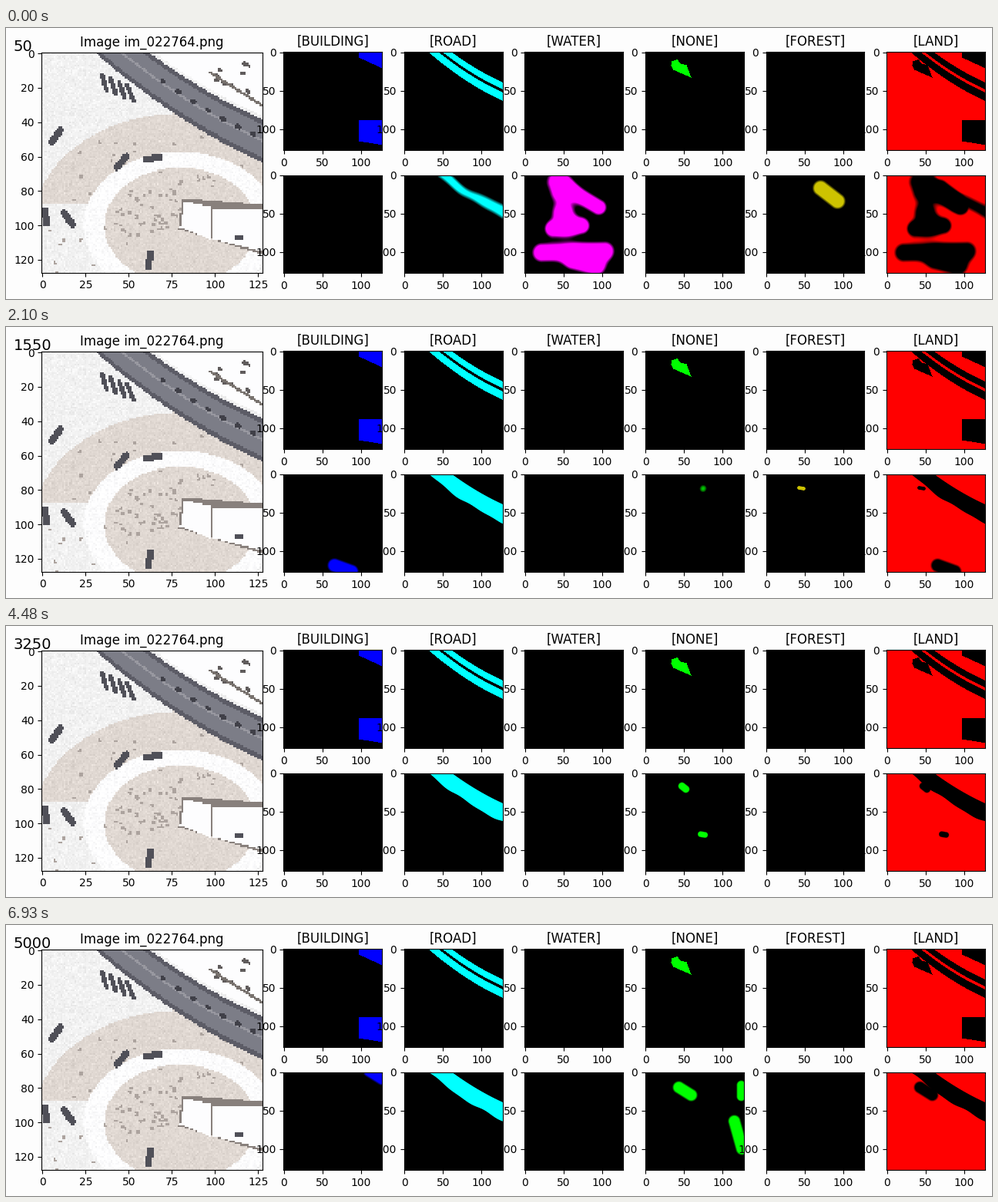
A matplotlib script that plays this animation: 1280x353 px, repeating every 7 s.

```python
import numpy as np
import matplotlib.pyplot as plt
from matplotlib.animation import FuncAnimation
from matplotlib.path import Path

W, H, DPI = 1280, 353, 100
N, FRAMES, STEP = 128, 100, 50
COLORS = {
    "BUILDING": (0, 0, 255),
    "ROAD": (0, 255, 255),
    "WATER": (255, 0, 255),
    "NONE": (0, 255, 0),
    "FOREST": (205, 195, 0),
    "LAND": (255, 0, 0),
}

rng = np.random.default_rng(7)
Y, X = np.mgrid[0:N, 0:N].astype(float)
GRID = np.column_stack([X.ravel(), Y.ravel()])


def inside(*pts):
    return Path(pts).contains_points(GRID).reshape(N, N)


def distance(a, b):
    """Distance of every pixel to the segment a-b."""
    (ax, ay), (bx, by) = a, b
    dx, dy = bx - ax, by - ay
    t = ((X - ax) * dx + (Y - ay) * dy) / max(dx * dx + dy * dy, 1e-9)
    t = np.clip(t, 0, 1)
    return np.hypot(X - ax - t * dx, Y - ay - t * dy)


def curve(x):
    """Lower edge of the highway; all road shapes are bands above it."""
    return .86 * (x - 31) - .0021 * (x - 31) ** 2


DEPTH = curve(X) - Y


def band(near, far):
    return (DEPTH > near) & (DEPTH < far)


def paint(mask, cls):
    return (mask[..., None] * COLORS[cls]).astype(np.uint8)


# ---- aerial view, reduced to flat shapes ----
def aerial():
    img = np.full((N, N, 3), 242.0)
    dark, sand, white = (80, 80, 88), (224, 216, 210), (253, 253, 254)

    def bar(x, y, length, deg, width=4, color=dark):
        a = np.radians(deg)
        d = np.array([np.cos(a), np.sin(a)]) * (length - width) / 2
        img[distance((x - d[0], y - d[1]), (x + d[0], y + d[1])) < width / 2] = color

    # curved track between two sandy rings
    ring = np.hypot((X - 80) / 55, (Y - 100) / 42)
    img[(ring > 1.02) & (ring < 1.55) & (Y < 88)] = sand
    img[(ring > .8) & (ring < 1.02)] = white
    img[ring < .8] = sand
    img += rng.normal(0, 5, (N, N, 1))
    for a, r in rng.uniform((2.6, .1), (5.6, 1.5), (110, 2)):
        if not .8 < r < 1.05:
            bar(80 + 55 * r * np.cos(a), 100 + 42 * r * np.sin(a), 2, 0, 1.8,
                (172, 163, 158))

    # upper right block, highway with lanes and cars
    img[DEPTH > 27] = white
    for x, y in rng.uniform((97, 4), (126, 24), (9, 2)):
        bar(x, y, 3, 30, 2, (96, 92, 92))
    img[distance((97, 11), (127, 30)) < .8] = (120, 114, 110)
    img[band(0, 25)] = (124, 125, 135)
    img[band(0, 3) | band(22, 25)] = (92, 92, 102)
    img[band(12, 13.5)] = (152, 152, 160)
    for x in np.linspace(70, 122, 7):
        bar(x, curve(x) - 14, 4, 32, 2.6, (64, 64, 72))

    # lower right halls
    halls = inside((81, 84), (128, 88), (128, 117), (79, 102))
    img[halls] = (136, 128, 124)
    img[inside((82, 86), (97, 89), (97, 108), (80, 101))] = white
    img[inside((99, 90), (128, 90), (128, 115), (99, 108))] = white
    bar(114, 107, 5, 0, 3)

    # parked vehicles
    for i in range(4):
        bar(36 + 5 * i, 17 + 2 * i, 12, 75 - 3 * i, 2.6)
    for x, y, deg in ((8, 48, -55), (46, 63, -50), (64, 61, -5),
                      (15, 96, 57), (62, 120, -85), (2, 95, 80)):
        bar(x, y, 12, deg)
    return np.clip(img, 0, 255).astype(np.uint8)


# ---- labelled masks, top row ----
def truth():
    m = {c: np.zeros((N, N), bool) for c in COLORS}
    m["BUILDING"] = (inside((97.5, -1), (129, -1), (129, 21.5), (97.5, 7))
                     | inside((98, 88), (129, 89), (129, 121), (97.5, 116)))
    m["ROAD"] = band(0, 11) | band(15, 24)
    m["NONE"] = inside((34, 12), (41, 9.5), (45, 15), (53, 17), (59, 33),
                       (45, 27), (36, 23), (33, 17))
    m["LAND"] = ~(m["BUILDING"] | m["ROAD"] | m["NONE"])
    return m


# ---- predicted masks, bottom row ----
blobs = []


def blob(when, cls, a, b, r, cut=True, life=3):
    """Soft capsule that swells and fades around a moment; cut hides LAND."""
    blobs.append((when, cls, np.exp(-(distance(a, b) / r) ** 2), cut, life))


# untrained start: puddles of water over the land
for a, b, r in (((44, 9), (48, 20), 15), ((56, 18), (96, 42), 10),
                ((50, 50), (54, 62), 14), ((36, 70), (74, 66), 10),
                ((22, 101), (104, 99), 12), ((64, 110), (92, 118), 13)):
    blob(0, "WATER", a, b, r, life=9)
blob(0, "FOREST", (70, 17), (92, 34), 10, life=9)

# stray detections that last a few steps
blob(18, "NONE", (37, 13), (54, 23), 8)
blob(30, "BUILDING", (66, 119), (88, 127), 9)
blob(30, "FOREST", (42, 18), (48, 19), 2.5)
blob(44, "NONE", (4, 90), (18, 90), 18, cut=False)
blob(44, "NONE", (32, 104), (60, 118), 9, cut=False)
blob(44, "NONE", (43, 23), (49, 25), 3.5, cut=False)
blob(64, "NONE", (47, 17), (52, 21), 5)
blob(79, "BUILDING", (66, 62), (71, 57), 7)
blob(99, "BUILDING", (112, -2), (128, 8), 9, cut=False)
blob(99, "NONE", (43, 20), (59, 30), 8)
blob(99, "NONE", (124, 17), (124, 32), 6, cut=False)
blob(99, "NONE", (115, 64), (125, 100), 8, cut=False)
for when in range(9, 96, 5):
    p = rng.uniform(15, 112, 2)
    blob(when, str(rng.choice(["NONE", "BUILDING"])), p, p + rng.uniform(-8, 8, 2),
         rng.uniform(3, 7), life=2)


def ramp(field):
    return np.clip((field - .3) * 4, 0, 1)


def road(n):
    young = max(0, 1 - n / 9)
    wobble = np.sin(X / 9 + 1.9 * n) + .6 * np.sin(X / 5 - 2.7 * n)
    neck = 5 * young * np.exp(-((X - 80) / 16) ** 2)
    edge = np.minimum(DEPTH - 9 * young + wobble, 24 - DEPTH - neck)
    return np.clip(.5 + edge * (1 - .8 * young), 0, 1)


def predict(n):
    fields = {c: np.zeros((N, N)) for c in COLORS}
    cover = np.zeros((N, N))
    for when, cls, shape, cut, life in blobs:
        grow = max(0, 1 - abs(n - when) / life)
        if grow:
            fields[cls] += grow * shape
            cover += cut * grow * shape
    masks = {c: ramp(f) for c, f in fields.items()}
    masks["ROAD"] = road(n)
    masks["LAND"] = (1 - ramp(cover)) * (1 - masks["ROAD"])
    return masks


# ---- figure ----
fig = plt.figure(figsize=(W / DPI, H / DPI), dpi=DPI, facecolor="#fdfdfd")


def panel(x, y, size, data, xticks, yticks, title=""):
    ax = fig.add_axes([x / W, 1 - (y + size) / H, size / W, size / H])
    im = ax.imshow(data, aspect="auto", interpolation="nearest")
    ax.set_xticks(xticks)
    ax.set_yticks(yticks)
    ax.set_title(title, fontsize=12)
    return im


panel(46.2, 32.05, 286.6, aerial(), range(0, 126, 25), range(0, 121, 20),
      "Image im_022764.png")
labels, first = truth(), predict(0)
views = {}
for i, cls in enumerate(COLORS):
    x = 360.2 + 156.6 * i
    marks = (0, 50, 100)
    panel(x, 31.4, 127.8, paint(labels[cls], cls), marks, marks, f"[{cls}]")
    views[cls] = panel(x, 191.5, 127.8, paint(first[cls], cls), marks, marks)
counter = fig.text(9.5 / W, 1 - 30 / H, str(STEP), fontsize=14)


def update(n):
    for cls, mask in predict(n).items():
        views[cls].set_data(paint(mask, cls))
    counter.set_text(str(STEP * (n + 1)))
    return [*views.values(), counter]


anim = FuncAnimation(fig, update, frames=FRAMES, interval=70, repeat=True,
                     repeat_delay=0)
plt.show()
```
